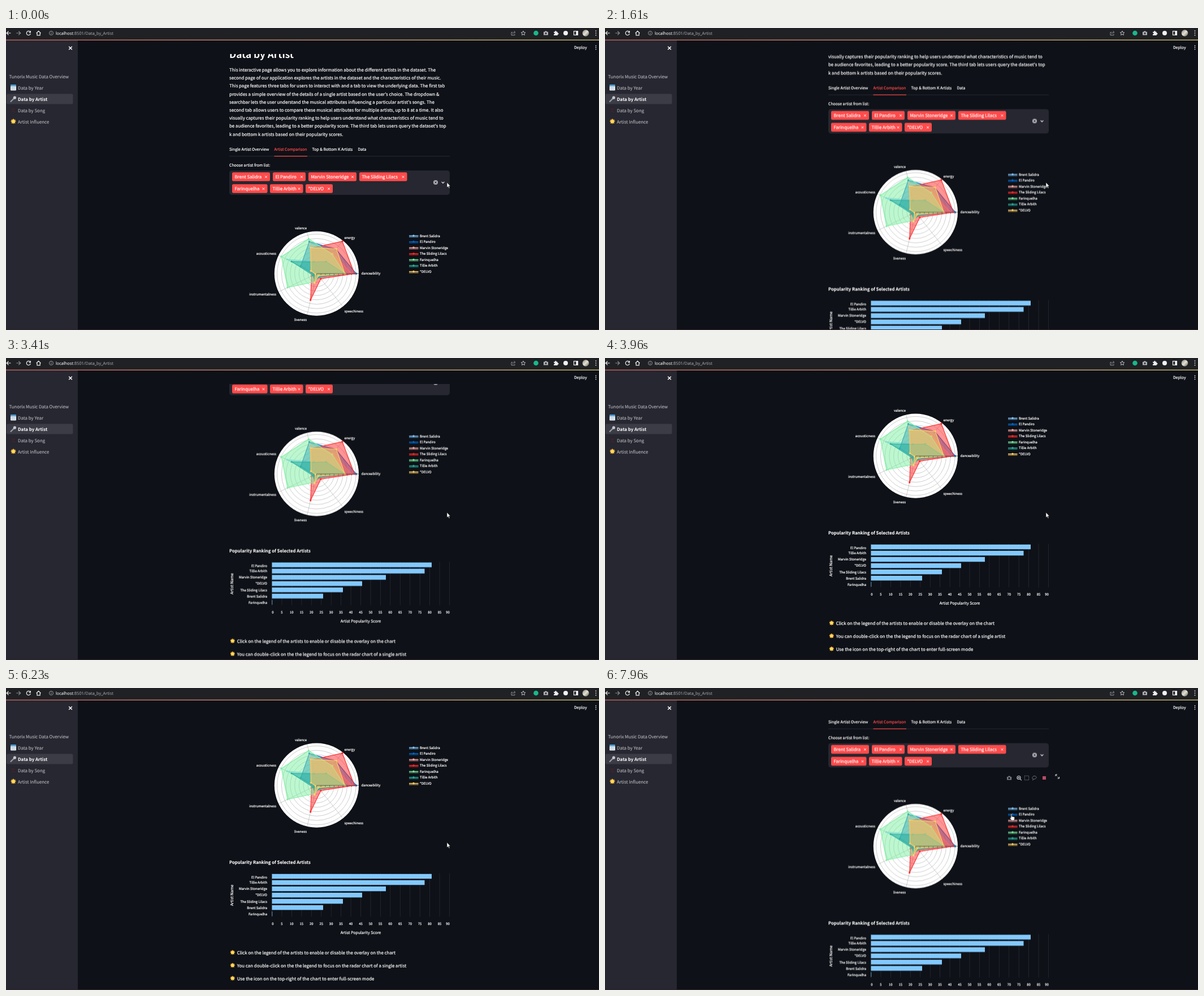
Recreate the animation shown at these times as an HTML page. Size 1049 by 534 pixels, loop 8000 ms.

```html
<!DOCTYPE html>
<html lang="en">
<head>
<meta charset="utf-8">
<title>Data by Artist</title>
<style>
html, body { margin: 0; width: 100%; height: 100%; overflow: hidden; background: #0e1117; }
svg { display: block; width: 1049px; height: 534px; }
text {
  font: 7.88px "Noto Sans CJK JP", "Noto Sans CJK SC", "Noto Sans CJK", "Open Sans", sans-serif;
  color: #fff; fill: currentColor; stroke: currentColor; stroke-width: .2;
  text-rendering: geometricPrecision; white-space: pre;
}
.url { font: 7.4px "Open Sans", "Noto Sans", sans-serif; color: #9aa0a6; stroke-width: .1; }
.host { fill: #f1f3f4; stroke: #f1f3f4; }
.nav { color: #b9babf; stroke-width: .1; }
.mid { font-size: 6.92px; }
.small { font-size: 5.9px; }
.bold { font-weight: 700; stroke-width: 0; }
.head { font-size: 7.75px; font-weight: 700; stroke-width: .1; }
.title { font-size: 17.2px; font-weight: 700; stroke-width: 0; }
.red { color: #ff4b4b; }
.end { text-anchor: end; }
.center { text-anchor: middle; }
.line { fill: none; stroke: #f1f1f1; stroke-width: 1.2; }

#page { animation: scroll 8s step-end infinite; }
#pointer { animation: move 8s step-end infinite; }
#arrow { animation: leave 8s step-end infinite; }
#hand { animation: appear 8s step-end infinite; }
#tools { animation: hover 8s step-end infinite; }

@keyframes scroll {
  0% { transform: translateY(0); }
  3.125% { transform: translateY(-12px); }
  5% { transform: translateY(-22px); }
  9.75% { transform: translateY(-34.4px); }
  11.625% { transform: translateY(-48px); }
  13.75% { transform: translateY(-62px); }
  15.875% { transform: translateY(-78px); }
  18% { transform: translateY(-95px); }
  20.125% { transform: translateY(-108.5px); }
  23.25% { transform: translateY(-124px); }
  25.125% { transform: translateY(-144px); }
  30.5% { transform: translateY(-161px); }
  32.5% { transform: translateY(-180px); }
  37.625% { transform: translateY(-197px); }
  39.25% { transform: translateY(-215px); }
  42.625% { transform: translateY(-229.3px); }
  44.125% { transform: translateY(-251.5px); }
  47.875% { transform: translateY(-261px); }
  49.625% { transform: translateY(-269px); }
  51.375% { transform: translateY(-272.5px); }
  58% { transform: translateY(-279px); }
  61.25% { transform: translateY(-282.5px); }
  69.375% { transform: translateY(-288.5px); }
  77.875% { transform: translateY(-262px); }
  80% { transform: translateY(-225px); }
  82.25% { transform: translateY(-190px); }
  84.5% { transform: translateY(-169.5px); }
  86% { transform: translateY(-166.5px); }
  89.5%, 100% { transform: translateY(-154.5px); }
}
@keyframes move {
  0% { transform: translate(780px, 273px); }
  91.125% { transform: translate(776px, 266px); }
  92.875% { transform: translate(764px, 251px); }
  94.5% { transform: translate(746px, 237px); }
  96.125% { transform: translate(729px, 229px); }
  97.875% { transform: translate(720px, 225px); }
  99.5%, 100% { transform: translate(717.5px, 222px); }
}
@keyframes leave { 0% { opacity: 1; } 96.125%, 100% { opacity: 0; } }
@keyframes appear { 0% { opacity: 0; } 96.125%, 100% { opacity: 1; } }
@keyframes hover { 0% { opacity: 0; } 91.125%, 100% { opacity: 1; } }
</style>
</head>
<body>
<svg viewBox="0 0 1049 534">
  <defs>
    <linearGradient id="stripe">
      <stop offset="0" stop-color="#c4625f"/><stop offset=".5" stop-color="#c98f74"/><stop offset="1" stop-color="#c9bd72"/>
    </linearGradient>
    <linearGradient id="avatar" x2="1" y2="1">
      <stop offset="0" stop-color="#8a8070"/><stop offset=".5" stop-color="#e6e2d8"/><stop offset="1" stop-color="#5a6048"/>
    </linearGradient>
    <clipPath id="view"><rect x="127" y="46" width="922" height="488"/></clipPath>
    <g id="sun">
      <path d="M0-5 1.3-3 3.6-3.6 3.1-1.2 5 0 3.1 1.3 3.6 3.6 1.3 3.1 0 5-1.3 3.1-3.6 3.6-3.1 1.3-5 0-3.1-1.2-3.6-3.6-1.3-3Z" fill="#e39a3c"/>
      <path d="M0-4.4 1.3-1.5 4.5-1.2 2.1.9 2.8 4 0 2.4-2.8 4-2.1.9-4.5-1.2-1.3-1.5Z" fill="#ffdf5a"/>
    </g>
    <path id="cross" d="M-1.8-1.8 1.8 1.8M1.8-1.8-1.8 1.8" fill="none" stroke="#fff" stroke-width="1"/>
  </defs>

  <rect width="1049" height="534" fill="#0e1117"/>
  <g clip-path="url(#view)"><g id="page"></g></g>

  <g id="sidebar">
    <rect y="21" width="127" height="513" fill="#262730"/>
    <rect x="1" y="116.5" width="117.5" height="18" rx="2.2" fill="#3b3c46"/>
    <use href="#cross" transform="translate(114 35.5) scale(1.55)"/>
    <rect x="8" y="100.5" width="10" height="10" rx="1.2" fill="#e8eef4"/>
    <path d="M8 100.5h10v2.8H8z" fill="#4aa3df"/>
    <path d="M9.5 105.5h7M9.5 108h7" stroke="#7f9db5" stroke-dasharray="1.3 .8"/>
    <path d="M8.5 130 14 124.5" stroke="#9a9ca5" stroke-width="2.2" stroke-linecap="round"/>
    <circle cx="15.4" cy="123.2" r="2.6" fill="#c3c5cc"/>
    <path d="M9 143.5l3-1 1 2 3-2M10 149l2-3 3 3 2-1" fill="none" stroke="#4b232c" stroke-width="1.1"/>
    <use href="#sun" x="13" y="165"/>
  </g>

  <g id="browser">
    <rect width="1049" height="21" fill="#202124"/>
    <rect y="20.6" width="1049" height="1.4" fill="url(#stripe)"/>
    <path class="line" d="M8.5 9H1.2M4.5 5.6 1.1 9l3.4 3.4"/>
    <path class="line" d="M18.3 9h7.2M22.3 5.6 25.7 9l-3.4 3.4" style="stroke:#8b8e92"/>
    <path class="line" d="M42.6 6.6A3.6 3.6 0 1 0 43.4 10M43.4 5v2.9h-2.9"/>
    <path class="line" d="M53.7 9.2 57.6 5.4 61.5 9.2M55 8.5v4.3h5.2V8.5"/>
    <g stroke="#9aa0a6" fill="none" stroke-width=".9">
      <circle cx="80" cy="9" r="3.5"/><path d="M80 8.4v2.5M80 6.6v.9"/>
      <path d="M896 7.5h-2v5.2h6v-2M896.5 10.5c0-2 1.3-3 3-3M898.7 5.5l2.3 2-2.3 2"/>
      <path stroke="#d0d2d5" d="M915 5.2l1.1 2.5 2.7.3-2 1.8.6 2.7-2.4-1.4-2.4 1.4.6-2.7-2-1.8 2.7-.3Z"/>
    </g>
    <circle cx="937.5" cy="9" r="4.3" fill="#17b88d"/>
    <path d="M951 6.8h2l.8-1.2h2.4l.8 1.2h2v5.6h-8z" fill="#b3b5b9"/><circle cx="955" cy="9.4" r="1.7" fill="#3c3e42"/>
    <path d="M969 6.7h2.2a1.3 1.3 0 1 1 2.4 0h2.1v2.2a1.3 1.3 0 1 1 0 2.4v1.8h-6.7v-2.3a1.2 1.2 0 1 0 0-2.2z" fill="#f1f1f1"/>
    <circle cx="990" cy="9" r="4" fill="#f1f1f1"/>
    <rect x="1004.5" y="5.6" width="7" height="6.8" class="line"/><path d="M1008.3 5.6h3.2v6.8h-3.2z" fill="#f1f1f1"/>
    <circle cx="1025.5" cy="9" r="5.8" fill="url(#avatar)"/>
    <path d="M1043.5 5.2v.1m0 3.6v.1m0 3.6v.1M1043.5 31.3v.1m0 3v.1m0 3v.1" stroke="#eee" stroke-width="1.7" stroke-linecap="round"/>
  </g>

  <g id="tools" fill="none" stroke="#73767d">
    <path d="M711 157h2l.8-1.4h2.6l.8 1.4h2v5.4H711z" fill="#73767d" stroke="none"/>
    <circle cx="715" cy="159.4" r="1.7" fill="#0e1117" stroke="none"/>
    <g stroke="#c8cacd" stroke-width="1.2"><circle cx="732" cy="158.5" r="3"/><path d="M734.2 160.7l2.6 2.6M730.5 158.5h3M732 157v3"/></g>
    <rect x="742.3" y="155.3" width="7.4" height="7.4" stroke-dasharray="1.6 1"/>
    <path d="M757 161c-3-2 0-5.6 3-5.4s4 3 2 4.5-4.5 1-5 .9c1 .5 1 1.6-1 2.2"/>
    <rect x="774" y="156" width="6" height="6" fill="#b84a68" stroke="none"/>
    <path d="M797 156v-3h3M797 153l2.6 2.6M803.5 157v3h-3M803.5 160l-2.6-2.6" stroke="#d5d6d9"/>
  </g>

  <rect y="533" width="1049" height="1" fill="#35202a"/>

  <g id="pointer" stroke="#111" stroke-width=".6" fill="#fff">
    <path id="arrow" d="M0 0V9.2L2.1 7.3 3.7 10.6 5 10 3.5 6.8H6.2Z"/>
    <path id="hand" d="M.5 1.2C.5 0 2.1 0 2.1 1.2V5l4 .9c.8.2 1.1.7 1 1.5L6.4 12.5H1.8L-1 8.3C-1.5 7.3-.3 6.7.5 7.6Z"/>
  </g>
</svg>

<script>
const el = id => document.getElementById(id);
const add = (parent, markup) => parent.insertAdjacentHTML('beforeend', markup);
// y is the middle of the capitals
const text = (x, y, str, cls = '', more = '') =>
  `<text x="${x}" y="${y}" dy=".36em" class="${cls}" ${more}>${str.replace('&', '&amp;')}</text>`;
const rect = (x, y, w, h, fill, more = '') =>
  `<rect x="${x}" y="${y}" width="${w}" height="${h}" fill="${fill}" ${more}/>`;
const page = el('page');

// radii follow the axes counterclockwise from danceability
const artists = [
  { name: 'Brent Salidra', color: '#83c9ff', radii: [42, 24, 22, 58, 4, 13, 4] },
  { name: 'El Pandiro', color: '#0068c9', radii: [70, 55, 58, 31, 5, 10, 8] },
  { name: 'Marvin Stoneridge', color: '#ffabab', radii: [62, 46, 54, 10, 3, 11, 9] },
  { name: 'The Sliding Lilacs', color: '#ff2b2b', radii: [67, 73, 46, 11, 10, 48, 12] },
  { name: 'Farinquelha', color: '#7defa1', radii: [50, 44, 63, 69, 57, 15, 5] },
  { name: 'Tillie Arbith', color: '#29b09d', radii: [49, 27, 21, 49, 7, 13, 8] },
  { name: '*DELVO', color: '#ffd16a', radii: [50, 56, 47, 11, 2, 17, 5] }
];

function drawFrame() {
  add(el('browser'), text(88, 9, '<tspan class="host">localhost</tspan>:8501/Data_by_Artist', 'url')
    + text(1005, 34.5, 'Deploy', 'mid'));
  add(el('sidebar'), text(5.5, 86, 'Tunorix Music Data Overview', 'nav')
    + text(21, 105.7, 'Data by Year', 'nav') + text(21, 125.7, 'Data by Artist', 'bold')
    + text(21, 145.7, 'Data by Song', 'nav') + text(21, 165.7, 'Artist Influence', 'nav'));
}

function drawIntro() {
  add(page, text(395, 47, 'Data by Artist', 'title'));
  [
    'This interactive page allows you to explore information about the different artists in the dataset. The',
    'second page of our application explores the artists in the dataset and the characteristics of their music.',
    'This page features three tabs for users to interact with and a tab to view the underlying data. The first tab',
    'provides a simple overview of the details of a single artist based on the user’s choice. The dropdown &',
    'searchbar lets the user understand the musical attributes influencing a particular artist\'s songs. The',
    'second tab allows users to compare these musical attributes for multiple artists, up to 8 at a time. It also',
    'visually captures their popularity ranking to help users understand what characteristics of music tend to',
    'be audience favorites, leading to a better popularity score. The third tab lets users query the dataset\'s top',
    'k and bottom k artists based on their popularity scores.'
  ].forEach((str, i) => add(page, text(395, 74.2 + 14.2 * i, str)));
}

function drawSelect() {
  add(page, rect(395, 226.4, 390, 0.8, '#31333d') + rect(474.5, 226, 58.5, 1.2, '#ff4b4b')
    + text(395, 214.8, 'Single Artist Overview', 'mid') + text(474.5, 214.8, 'Artist Comparison', 'mid red')
    + text(541.5, 214.8, 'Top & Bottom K Artists', 'mid') + text(622.5, 214.8, 'Data', 'mid')
    + text(395, 242.5, 'Choose artist from list:', 'mid')
    + rect(395, 252, 390, 43, '#262730', 'rx="4.4"'));
  const chips = [[400, 467], [472, 530], [535, 620], [625, 709.5], [400, 462.5], [467, 525.5], [530, 578]];
  chips.forEach(([left, right], i) => {
    const y = i < 4 ? 263 : 284;
    add(page, rect(left, y - 7.8, right - left, 15.6, '#ff4b4b', 'rx="2.2"')
      + text(left + 4.4, y, artists[i].name)
      + `<use href="#cross" x="${right - 7}" y="${y + .3}"/>`);
  });
  add(page, `<circle cx="760" cy="273" r="4.1" fill="#a7a8ad"/>
    <path d="M758.5 271.5l3 3m0-3-3 3" stroke="#262730"/>
    <path d="M770.6 271.9 773 274.3 775.4 271.9" class="line"/>`);
}

function drawRadar() {
  const cx = 549.4, cy = 434.2, R = 74.6, step = 7.75;
  const point = (r, i) => {
    const a = i * 2 * Math.PI / 7;
    return [cx + r * Math.cos(a), cy - r * Math.sin(a)].map(v => v.toFixed(2));
  };
  let out = `<circle cx="${cx}" cy="${cy}" r="${R}" fill="#fff"/><g fill="none" stroke="#a9abad" stroke-width=".6">`;
  for (let k = 1; k < 10; k++) out += `<circle cx="${cx}" cy="${cy}" r="${k * step}"/>`;
  for (let i = 0; i < 7; i++) out += `<path d="M${cx} ${cy}L${point(R, i)}"/>`;
  out += '</g>';
  for (const { color, radii } of artists) {
    const points = radii.map(point);
    out += `<polygon points="${points.join(' ')}" fill="${color}" fill-opacity=".5" stroke="${color}" stroke-width="1.1"/>`
      + points.map(([x, y]) => `<circle cx="${x}" cy="${y}" r="1.65" fill="${color}"/>`).join('');
  }
  out += `<path d="M${cx} ${cy}h${R}" stroke="#444" stroke-width=".7"/>`;
  for (let k = 0; k < 10; k++) out += `<path d="M${cx + k * step} ${cy}v2.8" stroke="#444" stroke-width=".6"/>`;
  out += text(628.5, 434.3, 'danceability', 'small') + text(598.5, 370.5, 'energy', 'small')
    + text(532, 353.8, 'valence', 'small end') + text(478, 399.3, 'acousticness', 'small end')
    + text(478, 471.3, 'instrumentalness', 'small end') + text(532, 516.3, 'liveness', 'small end')
    + text(598.5, 500.6, 'speechiness', 'small');
  artists.forEach(({ name, color }, i) => {
    const y = 367.6 + 10.55 * i;
    out += rect(713, y - .4, 16.5, 3.2, color, 'opacity=".5"') + rect(713, y - 1, 16.5, 1.1, color)
      + `<circle cx="721" cy="${y - .4}" r="1.7" fill="${color}"/>` + text(732, y, name, 'small');
  });
  add(page, out);
}

function drawRanking() {
  let out = text(395, 570.3, 'Popularity Ranking of Selected Artists', 'head');
  for (let k = 0; k <= 18; k++) {
    const x = 470.5 + 17.44 * k;
    out += rect(x - .3, 589.5, .7, 77, '#2b2e36')
      + text(k === 0 ? 472 : k === 18 ? 781.5 : x, 679.3, String(5 * k), 'small center');
  }
  const ranking = [[1, 753], [5, 740.5], [2, 672], [6, 630], [3, 596], [0, 561], [4, 471.2]];
  ranking.forEach(([artist, right], i) => {
    const y = 595 + 11.05 * i;
    out += rect(470.5, y - 4.2, right - 470.5, 8.4, '#83c9ff')
      + text(462, y + (i ? .2 : 2.2), artists[artist].name, 'small end');
  });
  out += text(627.5, 695, 'Artist Popularity Score', 'mid center')
    + text(0, 0, 'Artist Name', 'mid center', 'transform="translate(399 628.5) rotate(-90)"');
  [
    'Click on the legend of the artists to enable or disable the overlay on the chart',
    'You can double-click on the the legend to focus on the radar chart of a single artist',
    'Use the icon on the top-right of the chart to enter full-screen mode'
  ].forEach((tip, i) => {
    const y = 730 + 22.9 * i;
    out += `<use href="#sun" transform="translate(400.8 ${y - .6}) scale(.9)"/>` + text(408.7, y, tip);
  });
  add(page, out);
}

drawFrame();
drawIntro();
drawSelect();
drawRadar();
drawRanking();
</script>
</body>
</html>
```
